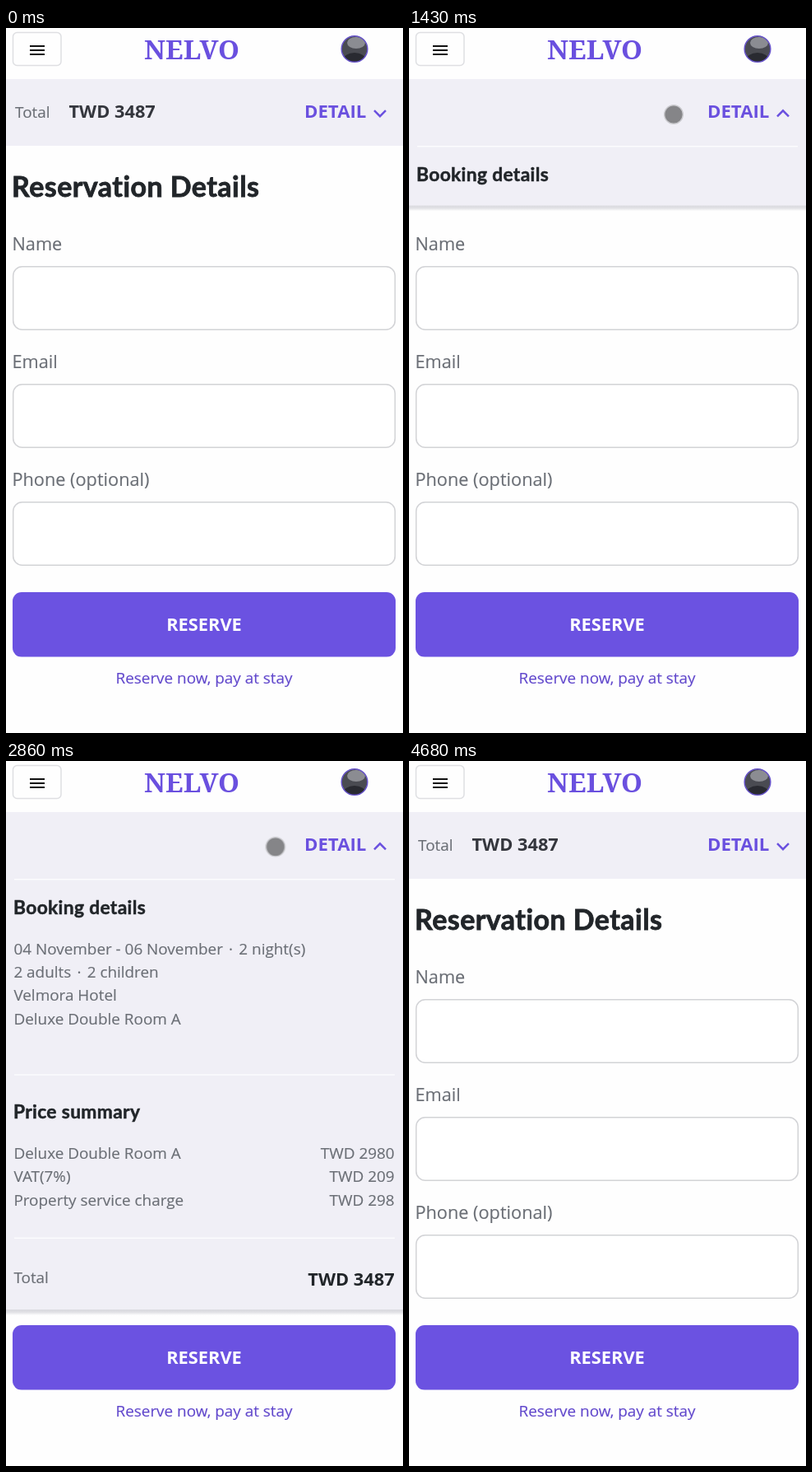
An HTML page that plays this animation: 483x856 px, repeating every 6.11 s.

```html
<!DOCTYPE html>
<html lang="en">
<head>
<meta charset="utf-8">
<title>Reservation</title>
<style>
@property --open { syntax: "<length>"; inherits: true; initial-value: 0px; }
html, body { margin: 0; width: 100%; height: 100%; overflow: hidden; background: #fefefe; }
svg { display: block; width: 483px; height: 856px; animation: fold 6110ms infinite paused; }
text { font: 18.9px "Open Sans", sans-serif; fill: #6a6e75; stroke: #6a6e75; stroke-width: .15; }
.big { font-size: 21.7px; }
.bold { font-size: 21.8px; font-weight: 700; fill: #212529; stroke: none; }
.head { font: 700 22.8px Lato, sans-serif; letter-spacing: .015em; fill: #212529; stroke: #212529; stroke-width: .5; }
.title { font-size: 34px; letter-spacing: .013em; stroke-width: .8; }
.brand { font: 700 33px "Noto Serif", serif; stroke: none; }
.purple { fill: #6a50df; }
.detail { font-size: 22.2px; }
.end { text-anchor: end; }
.mid { text-anchor: middle; }
.field { fill: #fff; stroke: #d2d3d6; stroke-width: 1.5; }
.line { stroke: #fcfcfe; stroke-width: 1.6; }
.chevron { fill: none; stroke: #6a50df; stroke-width: 2.5; }

.sheet { height: var(--open); }
.foot { transform: translateY(var(--open)); }
.closed, .opened, .foot { animation: 6110ms step-end infinite paused; }
.closed { animation-name: closed; }
.opened { animation-name: opened; }
.foot { animation-name: foot; }
.dot { animation: move 6110ms linear infinite paused; }

@keyframes fold {
  0%, 22.684% { --open: 0px; animation-timing-function: ease; }
  28.412%, 55.32% { --open: 523px; animation-timing-function: ease; }
  61.048%, 100% { --open: 0px; }
}
@keyframes closed {
  0% { visibility: visible; }
  22.684% { visibility: hidden; }
  55.074%, 100% { visibility: visible; }
}
@keyframes opened {
  0% { visibility: hidden; }
  22.684% { visibility: visible; }
  55.074%, 100% { visibility: hidden; }
}
@keyframes foot {
  0% { visibility: hidden; }
  22.684% { visibility: visible; }
  61.048%, 100% { visibility: hidden; }
}
@keyframes move {
  0% { transform: translate(334px, 880px); visibility: hidden; }
  6.37% { transform: translate(332px, 846px); visibility: visible; }
  8.511% { transform: translate(329px, 400px); }
  10.638% { transform: translate(326px, 137px); }
  12.766%, 17.02% { transform: translate(323px, 112px); }
  21.277%, 31.9% { transform: translate(322px, 105px); }
  34.043% { transform: translate(322px, 109px); }
  38.298%, 42.55% { transform: translate(323px, 111px); }
  53.191%, 70.21% { transform: translate(335px, 94px) scale(1.06); }
  72.34% { transform: translate(337px, 190px); }
  74.468% { transform: translate(340px, 560px); visibility: visible; }
  76.55%, 100% { transform: translate(344px, 880px); visibility: hidden; }
}
</style>
</head>
<body>
<svg viewBox="0 0 483 856">
  <defs>
    <clipPath id="fold"><rect class="sheet" y="143" width="483"/></clipPath>
    <clipPath id="round"><circle cx="424" cy="25.5" r="15.5"/></clipPath>
    <linearGradient id="shade" x2="0" y2="1">
      <stop stop-color="#d9d9de"/><stop offset=".45" stop-color="#e0e0e4"/><stop offset="1" stop-color="#fefefe"/>
    </linearGradient>
  </defs>

  <rect x="8.5" y="5.5" width="58.5" height="40" rx="5" fill="#fefefe" stroke="#dedfe2" stroke-width="1.5"/>
  <path d="M29 22h18M29 27h18M29 32h18" stroke="#111" stroke-width="2"/>
  <text class="brand purple mid" x="226" y="37.5">NELVO</text>
  <g clip-path="url(#round)">
    <rect x="408" y="9" width="32" height="33" fill="#4a4b52"/>
    <ellipse cx="426" cy="18" rx="11" ry="7" fill="#8b8c92"/>
    <ellipse cx="424" cy="39" rx="14" ry="9" fill="#292a31"/>
  </g>
  <circle cx="424" cy="25.5" r="15.8" fill="none" stroke="#6450c8" stroke-width="1.5"/>

  <text class="head title" x="7" y="205">Reservation Details</text>
  <text class="big" x="7.5" y="270">Name</text>
  <text class="big" x="7.5" y="413">Email</text>
  <text class="big" x="7.5" y="556">Phone (optional)</text>
  <rect class="field" x="8.7" y="289.7" width="464.6" height="76.6" rx="11"/>
  <rect class="field" x="8.7" y="432.7" width="464.6" height="76.6" rx="11"/>
  <rect class="field" x="8.7" y="575.7" width="464.6" height="76.6" rx="11"/>
  <rect x="8" y="685" width="466" height="78.6" rx="11" fill="#6b52e1"/>
  <text class="bold mid" x="241" y="732.3" style="fill:#fff">RESERVE</text>
  <text class="mid" x="241" y="796" style="fill:#6148cc;stroke:#6148cc">Reserve now, pay at stay</text>

  <rect y="62" width="483" height="81" fill="#f0eff6"/>
  <rect class="foot" y="143" width="483" height="7" fill="url(#shade)"/>
  <g clip-path="url(#fold)">
    <rect y="143" width="483" height="523" fill="#f0eff6"/>
    <path class="line" d="M10 143.7H473M10 381H473M10 579.3H473"/>
    <text class="head" x="9" y="186.3">Booking details</text>
    <text x="9.4" y="234.7">04 November - 06 November<tspan dx="2.3"> ·</tspan><tspan dx="2.3"> 2 night(s)</tspan></text>
    <text x="9.4" y="263">2 adults<tspan dx="2.3"> ·</tspan><tspan dx="2.3"> 2 children</tspan></text>
    <text x="9.4" y="291.3">Velmora Hotel</text>
    <text x="9.4" y="319.7">Deluxe Double Room A</text>
    <text class="head" x="9" y="434.3">Price summary</text>
    <text x="9.4" y="483">Deluxe Double Room A</text>
    <text class="end" x="472.6" y="483">TWD 2980</text>
    <text x="9.4" y="511.3">VAT(7%)</text>
    <text class="end" x="472.6" y="511.3">TWD 209</text>
    <text x="9.4" y="539.7">Property service charge</text>
    <text class="end" x="472.6" y="539.7">TWD 298</text>
    <text x="9.4" y="634">Total</text>
    <text class="bold end" x="472.6" y="636.7">TWD 3487</text>
  </g>

  <g class="closed">
    <text x="11" y="108.7">Total</text>
    <text class="bold" x="76.5" y="109.2" style="fill:#34363d">TWD 3487</text>
    <path class="chevron" d="M448 100.2l7 7 7-7"/>
  </g>
  <path class="chevron opened" d="M448 107.3l7-7 7 7"/>
  <text class="bold purple detail" x="363" y="109.2">DETAIL</text>

  <g class="dot">
    <circle r="11.3" fill="#858588" stroke="#c9c9cd" stroke-width="1.4"/>
  </g>
</svg>
<script>
// The picture refreshes every 130 ms, so time advances in those steps.
const LOOP = 6110, STEP = 130;
const start = performance.now();
const parts = document.getAnimations();
function draw() {
  const t = (performance.now() - start) % LOOP;
  const held = Math.floor(t / STEP) * STEP;
  for (const part of parts) part.currentTime = held;
  requestAnimationFrame(draw);
}
draw();
</script>
</body>
</html>
```
